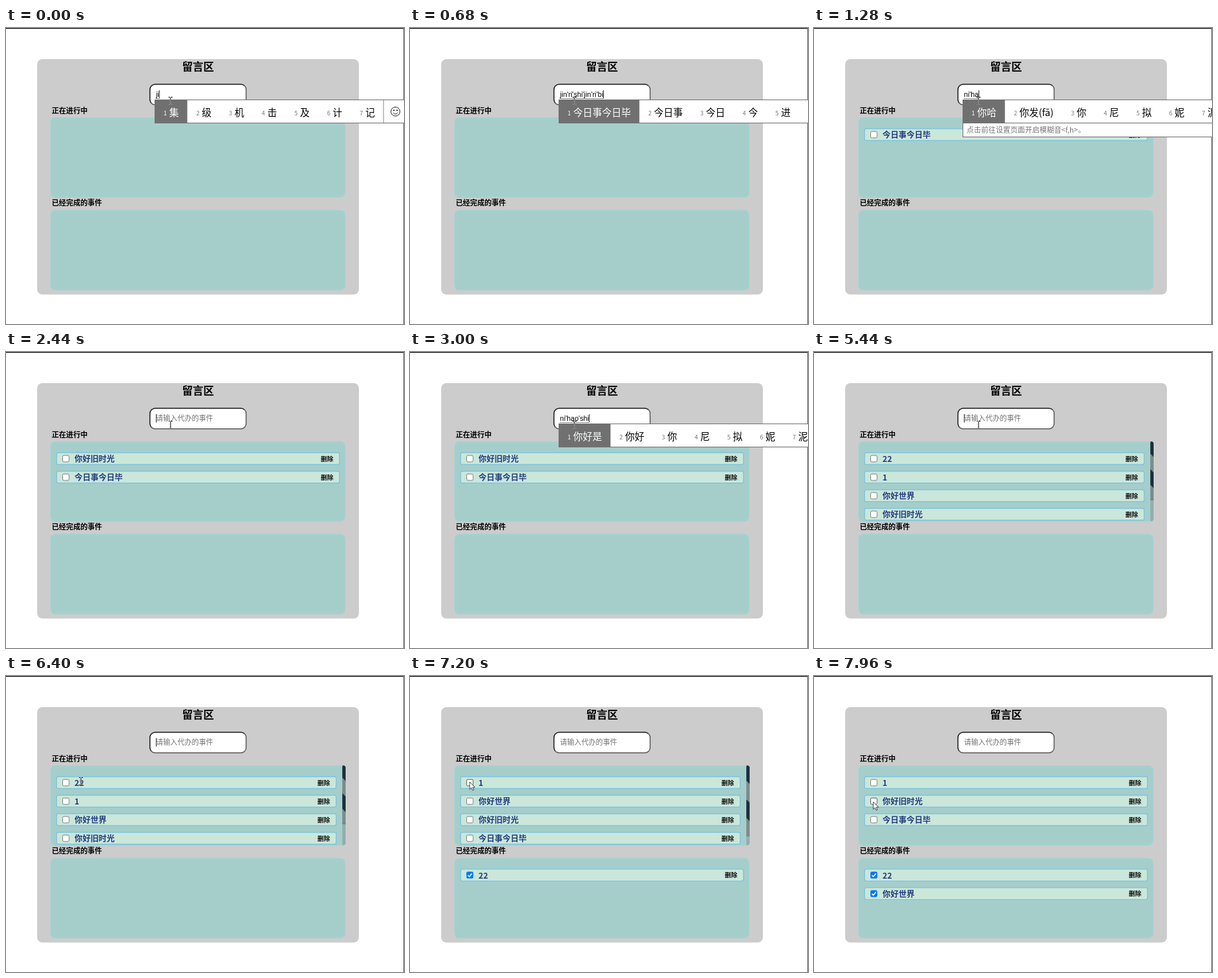
An HTML page for the animation above (8 s loop, 600 by 447 pixels).

```html
<!DOCTYPE html>
<html lang="zh-CN">
<head>
<meta charset="utf-8">
<title>留言区</title>
<style>
html, body { margin: 0; width: 100%; height: 100%; overflow: hidden; background: #fff; }
svg { display: block; width: 600px; height: 447px; }
text { font-family: "Noto Sans CJK SC", "Noto Sans CJK", sans-serif; white-space: pre; }
.title { font-size: 16px; font-weight: 700; text-anchor: middle; }
.head { font-size: 10.8px; font-weight: 700; }
.item { font-size: 12.1px; font-weight: 700; fill: #233c80; }
.del { font-size: 9.5px; font-weight: 600; fill: #111; }
.hold { font-size: 10.8px; font-weight: 300; fill: #757575; }
.typed { font-size: 10.67px; font-family: "Liberation Sans", "Noto Sans CJK SC", sans-serif; }
.cand { font-size: 14.5px; }
.num { font-size: 9px; fill: #777; }
.hint { font-size: 11px; fill: #777; }
.on { fill: #fff; }
.beam { mix-blend-mode: difference; }
</style>
</head>
<body>
<svg viewBox="0 0 600 447">
  <defs>
    <clipPath id="clip"><rect x="66" y="134" width="447" height="122.5" rx="7"/></clipPath>
    <clipPath id="thumb"><rect id="thumbShape" x="507" y="135" width="5" rx="2"/></clipPath>
  </defs>
  <rect width="600" height="447" fill="#fff"/>
  <rect x="47" y="47" width="485" height="355.5" rx="8" fill="#ccc"/>
  <text class="title" x="289.5" y="64.3">留言区</text>
  <g id="boxes"></g>
  <text class="head" x="69" y="128.7">正在进行中</text>
  <g id="todo" clip-path="url(#clip)"></g>
  <g id="done"></g>
  <text class="head" x="69" y="268.4">已经完成的事件</text>
  <rect x="217" y="85" width="145" height="31" rx="8" fill="#fff"/>
  <g fill="none" stroke-width="1.5">
    <path d="M219.3 113.7A8 8 0 0 1 217 108V93A8 8 0 0 1 225 85H354A8 8 0 0 1 359.7 87.3" stroke="#1b1b1b"/>
    <path d="M359.7 87.3A8 8 0 0 1 362 93V108A8 8 0 0 1 354 116H225A8 8 0 0 1 219.3 113.7" stroke="#5c5c5c"/>
  </g>
  <g id="field"></g>
  <rect width="600" height="1.2" fill="#111"/>
  <rect x="599" width="1" height="447" fill="#666"/>
  <g id="popup"></g>
  <path id="beam" class="beam" d="M-3 -5.5H-1L0 -4.5L1 -5.5H3M0 -4.5V4.5M-3 5.5H-1L0 4.5L1 5.5H3" fill="none" stroke="#fff"/>
  <path id="arrow" d="M0 0V11.2L2.6 8.8L4.4 12.8L6.2 12L4.5 8.1H8Z" fill="#fff" stroke="#222" stroke-width=".8"/>
</svg>
<script>
const LOOP = 8000, BLINK = 720;
const $ = id => document.getElementById(id);
const pen = document.createElement('canvas').getContext('2d');

// time, text in the field, candidates (none once committed), hint
const typing = [
  [0, "ji", "集 级 机 击 及 计 记"],
  [80, "jin", "今 进 近 金 仅 尽 紧"],
  [160, "jin'r", "今日 今人 今 进 近 金 仅"],
  [240, "jin'ri", "今日 今 进 近 金 仅 尽"],
  [320, "jin'ri's", "今日是 今日 今 进 近 金 仅"],
  [400, "jin'ri'shi", "今日事 今日是 今日 今 进 近 金"],
  [480, "jin'ri'shi'j", "今日事就 今日事 今日 今 进 近 金"],
  [560, "jin'ri'shi'jin'ri", "今日事今日 今日事 今日 今 进 近 金"],
  [640, "jin'ri'shi'jin'ri'bi", "今日事今日毕 今日事 今日 今 进 近"],
  [720, "今日事今日毕"],
  [820, ""],
  [960, "n", "你 那 年 能 呢 女 内"],
  [1040, "ni", "你 尼 拟 妮 泥 逆 腻"],
  [1160, "ni'h", "你好 你会 你还 你 尼 拟 妮"],
  [1240, "ni'ha", "你哈 你发(fā) 你 尼 拟 妮 泥", "点击前往设置页面开启模糊音<f,h>。"],
  [1320, "ni'hao", "你好 你 尼 拟 妮 泥 逆"],
  [1400, "ni'hao'j", "你好久 你好 你 尼 拟 妮 泥"],
  [1480, "ni'hao'jiu", "你好久 你好就 你好 你 尼 拟 妮"],
  [1560, "ni'hao'jiu's", "你好就是 你好久 你好 你 尼 拟"],
  [1640, "ni'hao'jiu'shi", "你好就是 你好旧时 你好 你 尼 拟"],
  [1840, "ni'hao'jiu'shi'g", "你好旧时光 你好就是 你好 你 尼"],
  [1960, "ni'hao'jiu'shi'guang", "你好旧时光 你好就是 你好 你 尼"],
  [2100, "你好旧时光"],
  [2240, ""],
  [2560, "n", "你 那 年 能 呢 女 内"],
  [2640, "ni", "你 尼 拟 妮 泥 逆 腻"],
  [2720, "ni'h", "你好 你会 你还 你 尼 拟 妮"],
  [2800, "ni'hao", "你好 你 尼 拟 妮 泥 逆"],
  [2900, "ni'hao's", "你好帅 你好是 你好 你 尼 拟 妮"],
  [2980, "ni'hao'shi", "你好是 你好 你 尼 拟 妮 泥"],
  [3080, "ni'hao'shi'jie", "你好世界 你好 你 尼 拟 妮 泥"],
  [3220, "你好世界"],
  [3360, ""],
  [4080, "1"],
  [4240, ""],
  [4840, "2"],
  [5000, "22"],
  [5340, ""]
];
const added = [[820, "今日事今日毕"], [2240, "你好旧时光"], [3360, "你好世界"], [4240, "1"], [5340, "22"]];
const checked = [[7000, "22"], [7700, "你好世界"]];
// time, x, y
const mouse = [[5700, 248, 110], [6280, 113, 159], [6440, 113, 159], [6640, 90, 160], [7400, 90, 160], [7620, 89.3, 190]];

const esc = s => String(s).replace(/&/g, '&amp;').replace(/</g, '&lt;');
const text = (cls, x, y, s) => `<text class="${cls}" x="${x}" y="${y}">${esc(s)}</text>`;
const rect = (x, y, w, h, attrs) => `<rect x="${x}" y="${y}" width="${w}" height="${h}" ${attrs}/>`;
const upTo = (list, t) => list.filter(e => e[0] <= t);

function widthOf(s, size, family) {
  pen.font = `${size}px ${family}`;
  return pen.measureText(s).width;
}

function put(id, html) {
  const el = $(id);
  if (el.shown !== html) el.innerHTML = el.shown = html;
}

function row(label, y, right, on, hover) {
  const box = on
    ? rect(85, y - 5.2, 10.4, 10.4, 'rx="2" fill="#0075ff"') +
      `<path d="M87.3 ${y + .2}l2.1 2.2l4 -4.8" fill="none" stroke="#fff" stroke-width="1.6"/>`
    : rect(85.4, y - 4.8, 9.7, 9.7, `rx="2" fill="#fff" stroke="${hover ? '#4f4f4f' : '#767676'}" stroke-width=".9"`);
  return rect(76.3, y - 9, right - 76.6, 18, 'rx="2.5" fill="#cae7da" stroke="#80c4dc" stroke-width="1.4"') +
    box + text('item', 103.3, y + 5.2, label) + text('del', right - 28.5, y + 3.5, '删除');
}

function scrollbar(count) {
  const h = 121 * 121 / (28 * count + 24.5), span = h + 5, end = 135 + h;
  $('thumbShape').setAttribute('height', h);
  const stripe = k => {
    const low = end - k * span, high = low - span / 4;
    return `<path d="M507 ${low}L512 ${low + 5}V${high + 5}L507 ${high}Z" fill="#7b8b8d"/>`;
  };
  return rect(507, 135, 5, 121, 'rx="2" fill="#93aeae"') +
    `<g clip-path="url(#thumb)">${rect(507, 135, 5, h, 'fill="#1b323a"')}${stripe(0)}${stripe(.5)}</g>`;
}

function popup(cands, hint) {
  let x = 224, cells = '';
  cands.split(' ').forEach((c, i) => {
    const w = 34.8 + widthOf(c, 14.5, '"Noto Sans CJK SC", sans-serif'), on = i ? '' : ' on';
    if (!i) cells += rect(x, 108.5, w, 35, 'fill="#707070"');
    cells += text('num' + on, x + 13.5, 131.5, i + 1) + text('cand' + on, x + 22, 133, c);
    x += w;
  });
  const line = 'fill="#fff" stroke="#707070"', w = Math.max(x, 569) + 40 - 224, face = x + 18;
  return rect(224.5, 108.5, w, 35, line) + cells +
    `<g fill="none" stroke="#222"><path d="M${x} 108.5v35" stroke="#888"/>
     <circle cx="${face}" cy="126.2" r="6.8"/><path d="M${face - 3.5} 128q3.5 4 7 0"/></g>
     <circle cx="${face - 2.4}" cy="124.3" r="1"/><circle cx="${face + 2.4}" cy="124.3" r="1"/>` +
    (hint ? rect(224.5, 143.5, w, 21, line) + text('hint', 230, 158.2, hint) : '');
}

function field(t, [since, value, cands]) {
  const w = value ? widthOf(value, 10.67, '"Liberation Sans", "Noto Sans CJK SC", sans-serif') : 0;
  const lit = t < checked[0][0] && (cands || (t - since) % BLINK < BLINK / 2);
  return (value ? text('typed', 226, 104, value) : text('hold', 226, 104.1, '请输入代办的事件')) +
    (cands ? `<path d="M226 106.5h${w}" stroke="#333" stroke-dasharray="1.2 1"/>` : '') +
    (lit ? rect(226 + w, 94, .9, 12.5, 'fill="#111"') : '');
}

function mouseAt(t) {
  const i = mouse.findIndex(p => p[0] > t);
  if (i < 1) return (i ? mouse[mouse.length - 1] : mouse[0]).slice(1);
  const [a, b] = [mouse[i - 1], mouse[i]], u = (t - a[0]) / (b[0] - a[0]), e = u * u * (3 - 2 * u);
  return [a[1] + (b[1] - a[1]) * e, a[2] + (b[2] - a[2]) * e];
}

function draw(t) {
  const done = upTo(checked, t).map(e => e[1]);
  const todo = upTo(added, t).map(e => e[1]).reverse().filter(s => !done.includes(s));
  const [mx, my] = mouseAt(t), now = upTo(typing, t).pop();
  const long = todo.length > 3, inBox = y => mx > 84 && mx < 96 && Math.abs(my - y) < 6;

  put('todo', todo.map((s, i) => row(s, 161 + 28 * i, long ? 498 : 503, false, inBox(161 + 28 * i))).join('') +
    (long ? scrollbar(todo.length) : ''));
  put('done', done.map((s, i) => row(s, 300.6 + 28 * i, 503, true)).join(''));
  put('field', field(t, now));
  put('popup', now[2] ? popup(now[2], now[3]) : '');

  const overField = mx > 217 && mx < 362 && my > 85 && my < 116;
  const overItem = mx > 102 && mx < 119 && my > 153 && my < 169;
  const beam = overField || overItem;
  $('beam').style.display = beam ? '' : 'none';
  $('arrow').style.display = beam ? 'none' : '';
  $(beam ? 'beam' : 'arrow').setAttribute('transform', `translate(${mx} ${my})`);
}

put('boxes', [135, 275].map(y =>
  rect(67.5, y + .5, 443.5, 120, 'rx="7" fill="#a5cecb" stroke="#a3d2d3" stroke-width="1.4"')).join(''));

function tick() {
  draw(performance.now() % LOOP);
  requestAnimationFrame(tick);
}
tick();
</script>
</body>
</html>
```
